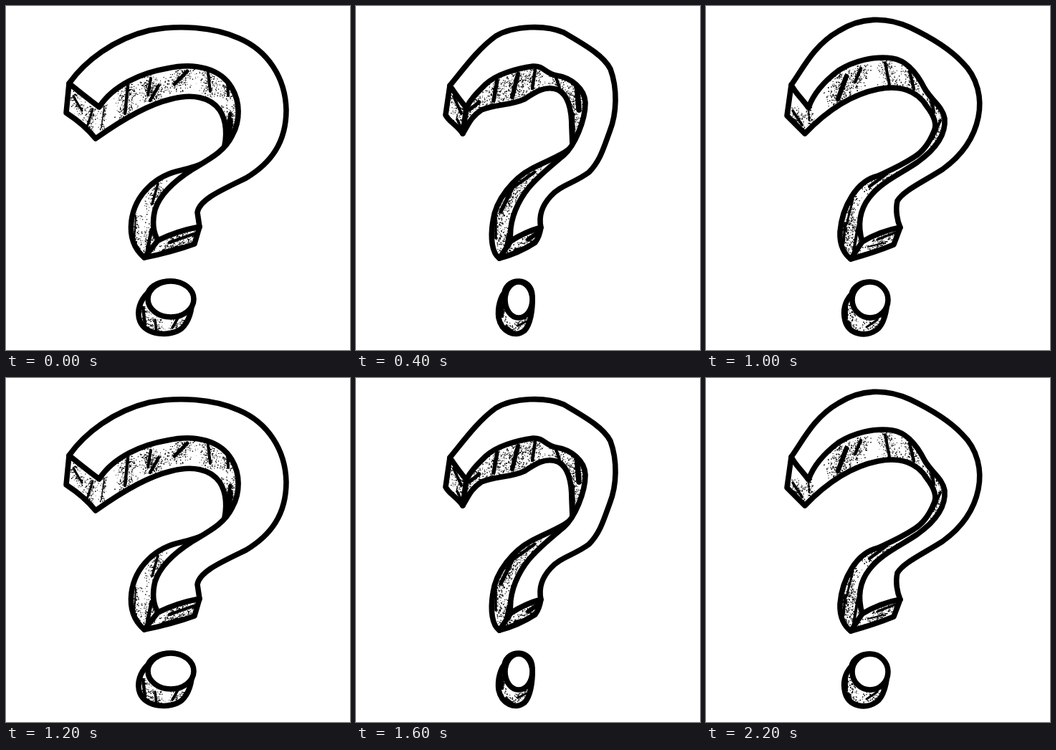
Recreate the animation shown at these times as an HTML page. Size 480x480 px, loop 2400 ms.

```html
<!DOCTYPE html>
<html lang="en">
<head>
<meta charset="utf-8">
<title>Turning question mark</title>
<style>
  html, body { margin: 0; width: 100%; height: 100%; overflow: hidden; background: #fff; }
  svg { display: block; width: 100vw; height: 100vh; }
  .ink { fill: #fff; stroke: #000; stroke-width: 7.6; stroke-linejoin: round; stroke-linecap: round; }
  .ink * { vector-effect: non-scaling-stroke; }
</style>
</head>
<body>
<svg id="stage" viewBox="0 0 480 480"></svg>
<script>
// face: front outline; side: silhouette of the depth, closed behind the face;
// fold: edge of the lower end; dot: front ellipse; smudges: x1 y1 x2 y2 width.
const wide = {
  face: `M88 108C110 77 150 46 200 34C240 26 290 29 325 45C365 62 390 100 391 145C391 190 370 219 335 240
    C300 257 270 270 267 288L270 308Q238 314 212 327C205 315 204 300 208 284C215 262 235 244 260 228
    C285 213 305 203 316 180C327 160 327 134 315 114C300 88 265 78 225 87C190 93 150 110 130 141Q110 126 88 108Z`,
  side: `M88 108L84 149Q110 166 125 185C160 160 200 137 230 130C260 122 285 127 298 145C308 160 309 182 303 203
    C290 215 270 223 245 229C210 236 180 262 175 300C172 325 180 340 193 351Q230 344 263 332L270 308
    L240 290L290 240L350 180L350 100L290 60L200 60L110 100Z`,
  fold: 'M193 351L212 327M313 160Q312 182 303 203',
  dot: [230, 409, 32, 25],
  dotSide: `M198 400C207 378 255 378 260 405C260 425 256 440 245 450C230 462 195 460 187 440C181 425 188 410 198 400Z`,
  smudges: `94 126 106 146 6 121 144 113 169 6 170 112 166 150 9 137 140 133 170 3 202 101 198 124 8
    213 111 201 132 9 253 91 235 109 10 281 86 285 119 8 309 105 310 125 8 313 150 307 184 10
    212 248 204 276 7 181 293 179 331 4 203 312 196 347 10 228 330 262 318 9 218 342 245 335 5
    191 421 194 444 9 208 438 210 456 7 242 432 232 449 7`
};
const turned = {
  face: `M119 110C135 88 150 55 185 35C215 16 250 14 285 30C310 42 340 60 357 78C380 100 385 130 380 155
    C374 185 355 210 330 228C300 247 275 258 267 272C264 285 267 300 271 309Q243 314 218 329
    C211 305 214 285 228 267C245 245 270 235 295 218C320 200 335 180 333 157C330 140 315 132 305 115
    C295 95 280 76 260 73C235 69 205 77 185 90C165 105 150 122 143 142C133 128 125 122 119 110Z`,
  side: `M119 110L113 153L138 178C160 155 195 125 240 116C270 110 295 118 308 140C318 153 323 165 318 175
    C310 195 300 205 290 211C270 224 255 230 240 237C210 244 190 280 187 315C186 335 194 347 202 353
    Q235 344 262 333L271 309L244 290L290 238L350 180L345 110L270 50L200 60L138 105Z`,
  fold: 'M202 353L218 329',
  dot: [229, 410, 25, 25],
  dotSide: `M203 402C208 379 250 379 253 407C253 425 248 445 238 452C222 463 199 458 194 439C190 423 195 411 203 402Z`,
  smudges: `121 146 134 166 7 143 142 144 160 4 196 98 184 130 13 216 87 208 106 9 250 79 256 110 8
    284 91 290 116 9 312 120 318 148 9 327 160 316 185 8 251 235 228 252 9 205 270 196 305 6
    194 303 192 331 7 212 307 206 342 8 226 336 246 331 4 239 326 264 316 7
    195 417 195 434 12 199 440 204 454 6 224 448 239 438 6`
};
const slim = {
  face: `M131 111C150 88 170 60 195 42C220 27 265 26 290 37C315 52 345 68 355 88C365 115 364 150 354 175
    C345 200 340 217 325 232C305 247 285 250 272 265C258 280 255 295 258 309Q236 315 216 328
    C213 305 222 280 236 260C248 243 270 225 290 208C305 195 320 160 320 135C319 115 300 100 280 97
    C265 95 262 83 247 84C225 87 195 95 180 110C168 122 160 130 154 142Q143 129 131 111Z`,
  side: `M131 111L125 152C130 162 140 165 149 178C157 165 160 155 175 145C195 137 215 139 235 130
    C250 120 265 110 282 117C298 125 301 150 301 170L302 195C290 208 270 214 245 227C220 240 195 270 191 300
    C187 325 190 345 200 352Q227 345 250 330Q256 322 258 309L240 290L290 230L335 180L335 110L280 60
    L210 60L150 110Z`,
  fold: 'M200 352L216 328M154 142L149 178',
  dot: [227, 410, 19, 25],
  dotSide: `M207 400C211 378 245 378 246 404C247 425 243 445 235 453C222 463 203 455 199 435C197 420 202 406 207 400Z`,
  smudges: `136 126 147 150 8 141 158 147 170 7 158 145 172 134 10 197 104 192 132 11 226 95 218 127 12
    250 89 246 115 9 279 100 284 114 8 308 110 311 145 15 303 150 304 185 8 249 232 221 252 9
    220 250 202 287 11 195 288 195 324 7 212 318 207 344 7 240 326 254 316 12 222 340 238 336 7
    204 417 204 433 9 209 447 220 455 7 238 440 226 446 6`
};

function seeded(seed) {
  return () => (seed = (seed * 16807) % 2147483647) / 2147483647;
}

// A dry-brush mark: a solid core inside a cloud of grains.
function smudge([x1, y1, x2, y2, width], random) {
  const length = Math.hypot(x2 - x1, y2 - y1);
  const spread = () => (random() + random() + random() - 1.5) * width * 1.5;
  let grains = '';
  for (let i = 0; i < length * width * 0.75; i++) {
    const along = random() * 1.2 - 0.1;
    const x = x1 + (x2 - x1) * along + spread();
    const y = y1 + (y2 - y1) * along + spread();
    const size = 0.6 + random();
    grains += `M${x.toFixed(1)} ${y.toFixed(1)}h${size.toFixed(1)}v${size.toFixed(1)}h-${size.toFixed(1)}z`;
  }
  return `<path d="${grains}"/><path d="M${x1} ${y1}L${x2} ${y2}" stroke="#000"
    stroke-width="${width * 0.5}" stroke-linecap="round"/>`;
}

function drawing(pose, id, squeeze = 1) {
  const random = seeded(97 + id);
  const values = pose.smudges.trim().split(/\s+/).map(Number);
  let marks = '';
  for (let i = 0; i < values.length; i += 5) marks += smudge(values.slice(i, i + 5), random);
  const [cx, cy, rx, ry] = pose.dot;
  const depth = `<path d="${pose.side}"/><path d="${pose.dotSide}"/>`;
  return `<g class="pose" visibility="hidden" transform="translate(${235 * (1 - squeeze)} 0) scale(${squeeze} 1)">
    <clipPath id="depth${id}">${depth}</clipPath>
    <g class="ink">${depth}</g>
    <g clip-path="url(#depth${id})">${marks}</g>
    <g class="ink"><path d="${pose.fold}" fill="none"/><path d="${pose.face}"/>
      <ellipse cx="${cx}" cy="${cy}" rx="${rx}" ry="${ry}"/></g>
  </g>`;
}

const stage = document.getElementById('stage');
stage.innerHTML = drawing(wide, 0) + drawing(turned, 1) + drawing(slim, 2) + drawing(slim, 3, 0.87);
const poses = [...stage.querySelectorAll('.pose')];
const swing = [0, 1, 2, 3, 2, 1];
const start = performance.now();

function render(time) {
  const current = swing[Math.floor(time / 200) % swing.length];
  poses.forEach((pose, i) => pose.setAttribute('visibility', i === current ? 'visible' : 'hidden'));
}

function tick() {
  render(performance.now() - start);
  requestAnimationFrame(tick);
}
tick();
</script>
</body>
</html>
```
